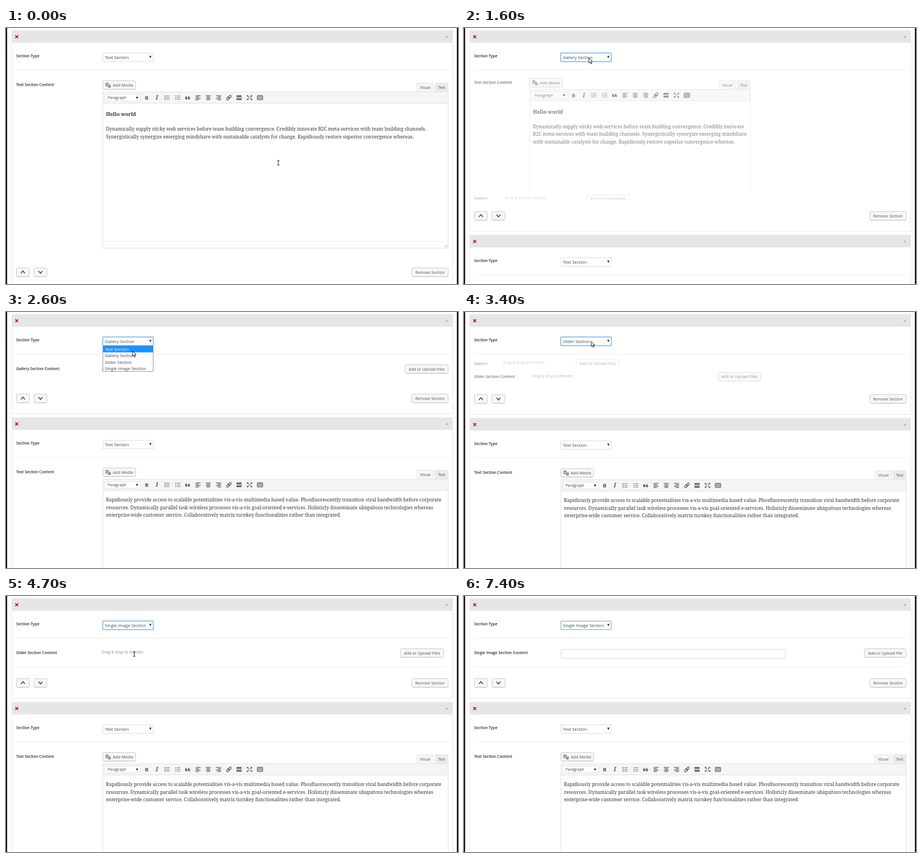
These frames come from a looping animation (800 px wide and 454 px high, 7.5 s). An HTML page with a canvas:

```html
<!DOCTYPE html>
<html lang="en">
<head>
<meta charset="utf-8">
<title>Section type editor</title>
<style>
  html, body { margin: 0; width: 100%; height: 100%; overflow: hidden; background: #fff; }
  canvas { display: block; }
</style>
</head>
<body>
<canvas id="stage" width="800" height="454"></canvas>
<script>
const ctx = document.getElementById('stage').getContext('2d');
const LOOP = 7500;
const SANS = '"Open Sans", "Noto Sans", sans-serif';
const SERIF = '"Noto Serif", serif';
const INK = '#444', LABEL = '#23282d', ICON = '#50555a';

const TYPES = ['Text', 'Gallery', 'Slider', 'Single Image'];
const HEIGHTS = [330, 50, 51, 50.5];

// Each change: list open time, pick time, slide start, and the item x positions while sliding.
const CHANGES = [
  { open: 850, pick: 1350, start: 1438, oldX: [116, 507], newX: [73, 217] },
  { open: 2400, pick: 3150, start: 3175, oldX: [69, 198], newX: [120, 449] },
  { open: 3850, pick: 4600, start: 4700, oldX: [120, 449], newX: [139, 310] }
];
const SLIDE = 400;

const POINTER = [
  [0, 482, 239], [100, 482, 239], [700, 222, 53], [950, 222, 53], [1200, 223, 77],
  [1350, 223, 77], [1550, 221, 53], [2350, 222, 54], [2550, 224, 69], [2700, 224, 69],
  [2950, 225, 90], [3150, 225, 90], [3350, 225, 52], [3850, 225, 53], [4250, 227, 101],
  [4600, 227, 103], [5450, 227, 103], [5850, 221, 91], [7500, 221, 91]
];

const FIRST_WIDE = [
  'Dynamically supply sticky web services before team building convergence. Credibly innovate B2C meta-services with team building channels.',
  'Synergistically synergize emerging mindshare with sustainable catalysts for change. Rapidiously restore superior convergence whereas.'
];
const FIRST_NARROW = [
  'Dynamically supply sticky web services before team building convergence. Credibly innovate',
  'B2C meta-services with team building channels. Synergistically synergize emerging mindshare',
  'with sustainable catalysts for change. Rapidiously restore superior convergence whereas.'
];
const SECOND = [
  'Rapidiously provide access to scalable potentialities vis-a-vis multimedia based value. Phosfluorescently transition viral bandwidth before corporate',
  'resources. Dynamically parallel task wireless processes vis-a-vis goal-oriented e-services. Holisticly disseminate ubiquitous technologies whereas',
  'enterprise-wide customer service. Collaboratively matrix turnkey functionalities rather than integrated.'
];

const swing = p => 0.5 - Math.cos(Math.PI * Math.min(1, Math.max(0, p))) / 2;

// Text is laid out at ten times its size so that glyph advances stay fractional.
function text(str, x, middle, size, { color = INK, weight = 400, style = 'normal', family = SANS, align = 'left' } = {}) {
  ctx.save();
  ctx.translate(x, middle + size * 0.36);
  ctx.scale(0.1, 0.1);
  ctx.font = `${style} ${weight} ${size * 10}px ${family}`;
  ctx.fillStyle = color;
  ctx.textAlign = align;
  ctx.fillText(str, 0, 0);
  ctx.restore();
}

function rect(x, y, w, h, color) {
  ctx.fillStyle = color;
  ctx.fillRect(x, y, w, h);
}

function box(x, y, w, h, fill, stroke, radius = 0) {
  ctx.beginPath();
  ctx.roundRect(x + 0.5, y + 0.5, w - 1, h - 1, radius);
  ctx.fillStyle = fill;
  ctx.fill();
  ctx.lineWidth = 1;
  ctx.strokeStyle = stroke;
  ctx.stroke();
}

function line(points, color = ICON, width = 1) {
  ctx.beginPath();
  points.forEach(([x, y]) => ctx.lineTo(x, y));
  ctx.lineWidth = width;
  ctx.strokeStyle = color;
  ctx.stroke();
}

function shape(points, color) {
  ctx.beginPath();
  points.forEach(([x, y]) => ctx.lineTo(x, y));
  ctx.closePath();
  ctx.fillStyle = color;
  ctx.fill();
}

function dot(x, y, r, color = ICON) {
  ctx.beginPath();
  ctx.arc(x, y, r, 0, 7);
  ctx.fillStyle = color;
  ctx.fill();
}

const downArrow = (x, y) => shape([[x - 2, y - 2], [x + 2, y - 2], [x, y + 2]], '#222');

function button(x, y, w, label) {
  box(x, y, w, 16, '#f7f7f7', '#ccc', 2);
  rect(x + 1, y + 16, w - 2, 1, '#e4e4e4');
  text(label, x + w / 2, y + 8, 7.05, { color: '#555', align: 'center' });
}

function alignIcon(x, y, side) {
  [9, 6, 9, 6].forEach((w, i) =>
    rect(x - 4.5 + (9 - w) * side, y - 4 + i * 2.4, w, 1.2, ICON));
}

function listIcon(x, y, numbered) {
  for (let i = -1; i <= 1; i++) {
    if (numbered) rect(x - 4, y + i * 3 - 1, 0.9, 2, ICON);
    else dot(x - 3.5, y + i * 3, 0.9);
    rect(x - 1.5, y + i * 3 - 0.5, 6, 1, '#777');
  }
}

function quoteIcon(x, y) {
  for (const dx of [-2.4, 2.4]) {
    dot(x + dx, y + 1.3, 1.9);
    ctx.beginPath();
    ctx.arc(x + dx + 1, y + 0.6, 2.6, Math.PI, Math.PI * 1.5);
    ctx.lineWidth = 1.2;
    ctx.strokeStyle = ICON;
    ctx.stroke();
  }
}

function linkIcon(x, y) {
  ctx.save();
  ctx.translate(x, y);
  ctx.rotate(-Math.PI / 4);
  ctx.lineWidth = 1.2;
  ctx.strokeStyle = ICON;
  for (const dx of [-5.2, -0.8]) {
    ctx.beginPath();
    ctx.roundRect(dx, -1.8, 6, 3.6, 1.8);
    ctx.stroke();
  }
  ctx.restore();
}

function moreIcon(x, y) {
  rect(x - 4.5, y - 4, 9, 2.6, ICON);
  for (let i = 0; i < 3; i++) rect(x - 4.5 + i * 3.4, y - 0.5, 2.2, 1, ICON);
  rect(x - 4.5, y + 1.4, 9, 2.6, ICON);
}

function expandIcon(x, y) {
  for (const sx of [-1, 1]) for (const sy of [-1, 1]) {
    line([[x + sx, y + sy], [x + 4 * sx, y + 3.5 * sy]], ICON, 1.2);
    shape([[x + 4.7 * sx, y + 4.2 * sy], [x + 1.8 * sx, y + 4.2 * sy], [x + 4.7 * sx, y + 1.4 * sy]], ICON);
  }
}

function keyboardIcon(x, y) {
  box(x - 5, y - 4.5, 11, 9, '#97999c', '#777b7f', 1);
  for (let i = 0; i < 8; i++) rect(x - 3.4 + (i % 4) * 2.1, y - 2.3 + (i >> 2) * 2, 1, 1, '#ddd');
  rect(x - 2, y + 1.8, 5, 0.9, '#ddd');
}

function mediaIcon(x, y) {
  const color = '#72777c';
  ctx.lineWidth = 1.2;
  ctx.strokeStyle = color;
  ctx.strokeRect(x - 4, y - 3, 4.6, 4.2);
  rect(x - 3, y - 4.4, 2.6, 1.4, color);
  dot(x - 1.7, y - 0.9, 0.9, color);
  line([[x + 2.2, y + 3], [x + 2.2, y - 0.6], [x + 4.4, y - 0.6], [x + 4.4, y + 2.8]], color);
  dot(x + 1.5, y + 3.2, 1.2, color);
  dot(x + 3.7, y + 3, 1.2, color);
}

function toolbar(left, right, y) {
  box(left, y, right - left, 21, '#f5f5f5', '#e3e3e3');
  const mid = y + 10.5;
  const x = offset => left + offset;
  box(x(4), y + 4, 64, 13, '#fff', '#e4e4e4');
  text('Paragraph', x(9), mid, 6.8);
  downArrow(x(61), mid + 0.5);
  text('B', x(78), mid, 9.5, { weight: 700, color: ICON, align: 'center' });
  text('I', x(96), mid, 10, { weight: 700, style: 'italic', family: SERIF, color: ICON, align: 'center' });
  listIcon(x(114), mid, false);
  listIcon(x(133), mid, true);
  quoteIcon(x(150.5), mid);
  [0, 0.5, 1].forEach((side, i) => alignIcon(x(169 + i * 18), mid, side));
  linkIcon(x(223.5), mid);
  moreIcon(x(241.5), mid);
  expandIcon(x(260), mid);
  keyboardIcon(x(278), mid);
}

function tab(x, y, w, label, fill) {
  box(x, y, w, 17, fill, '#e5e5e5');
  text(label, x + w / 2, y + 8.5, 6.8, { color: '#555', align: 'center' });
}

const rowLabel = (str, y) => text(str, 18, y, 6.75, { weight: 600, color: LABEL });

function textRow(y, left, right, heading, lines) {
  rowLabel('Text Section Content', y + 27);
  button(left, y + 19, 59, '');
  mediaIcon(left + 9.5, y + 27.5);
  text('Add Media', left + 18, y + 27.5, 7.2, { color: '#555' });
  tab(right - 56, y + 23, 30, 'Visual', '#f5f5f5');
  tab(right - 24, y + 23, 24, 'Text', '#ebebeb');
  box(left, y + 39, right - left, 278, '#fff', '#e3e3e3');
  toolbar(left, right, y + 39);
  rect(left + 1, y + 304, right - left - 2, 1, '#eee');
  for (let i = 0; i < 3; i++)
    line([[right - 7 + i * 2, y + 315], [right - 2, y + 310 + i * 2]], '#aaa', 0.8);
  if (heading) text(heading, left + 6, y + 79, 8.9, { weight: 700, family: SERIF, color: '#333' });
  lines.forEach((str, i) =>
    text(str, left + 6, y + (heading ? 105 : 76) + i * 13.7, 8.4, { family: SERIF, color: '#333' }));
}

function contentRow(type, y, slideX) {
  if (type === 0) {
    const [left, right] = slideX || [171, 783];
    textRow(y, left, right, 'Hello world', slideX ? FIRST_NARROW : FIRST_WIDE);
  } else if (type === 3) {
    const [inputX, buttonX] = slideX || [171, 708];
    rowLabel('Single Image Section Content', y + 27);
    box(inputX, y + 20, slideX ? 162 : 398, 17, '#fff', '#ddd');
    button(buttonX, y + 19, 75, 'Add or Upload File');
  } else {
    const [hintX, buttonX] = slideX || [169.5, type === 1 ? 706 : 698];
    rowLabel(slideX && type === 1 ? 'Gallery' : TYPES[type] + ' Section Content', y + 27);
    text('Drag & Drop to Reorder', hintX, y + 25.5, 7.1, { style: 'italic', color: '#8c8c8c' });
    button(buttonX, y + 19, 77, 'Add or Upload Files');
  }
}

function slidingRow(type, y, shown, slideX) {
  const lift = (type === 0 ? 12 : 16) * (1 - shown);
  ctx.save();
  ctx.beginPath();
  ctx.rect(11, y, 779, HEIGHTS[type] * shown);
  ctx.clip();
  ctx.globalAlpha = shown;
  contentRow(type, y - lift, slideX);
  ctx.restore();
}

function selectBox(y, type, focus) {
  if (focus === 'full') box(170, y - 1, 92, 18, '#fff', '#cfe4f5', 1);
  box(171, y, 90, 16, '#fff', focus ? '#6ba8de' : '#ddd');
  text(TYPES[type] + ' Section', 175, y + 8.3, 7.6);
  downArrow(255.5, y + 7.5);
}

function sectionHead(top, bottom, type, focus) {
  rect(10, top, 781, bottom - top, '#e8e8e8');
  rect(11, top + 22, 779, bottom - top - 23, '#fff');
  rect(10, top, 781, 22, '#e6e6e6');
  const y = top + 11.5;
  line([[16.5, y - 2.5], [21.5, y + 2.5]], '#a00', 1.5);
  line([[21.5, y - 2.5], [16.5, y + 2.5]], '#a00', 1.5);
  shape([[778.5, y + 1.5], [782.5, y + 1.5], [780.5, y - 2]], '#aaa');
  rowLabel('Section Type', top + 46);
  selectBox(top + 40, type, focus);
  rect(18, top + 70, 766, 1, '#eee');
}

function sectionFoot(y) {
  [18, 49].forEach((x, i) => {
    button(x, y - 8, 24, '');
    const tip = i ? 2 : -2;
    line([[x + 8.5, y - tip], [x + 12, y + tip], [x + 15.5, y - tip]], '#444', 1.5);
  });
  button(718, y - 8, 65, 'Remove Section');
}

function dropdown(type, pointerY) {
  const hover = pointerY < 60 ? type : Math.min(3, Math.floor((pointerY - 60) / 11.4));
  box(171, 59, 90, 47, '#fff', '#7b9fc6');
  TYPES.forEach((name, i) => {
    if (i === hover) rect(172, 60 + i * 11.4, 88, 11.6, '#1e90ff');
    text(name + ' Section', 175, 66.2 + i * 11.4, 7.6, { color: i === hover ? '#fff' : INK });
  });
}

function pointerAt(t) {
  const i = POINTER.findIndex(key => key[0] > t);
  const [t0, x0, y0] = POINTER[i - 1], [t1, x1, y1] = POINTER[i];
  const p = swing((t - t0) / (t1 - t0));
  return [x0 + (x1 - x0) * p, y0 + (y1 - y0) * p];
}

function drawPointer(x, y, beam) {
  if (beam) {
    line([[x, y - 4], [x, y + 4]], '#222');
    for (const end of [y - 4, y + 4]) line([[x - 2, end], [x + 2, end]], '#222');
    return;
  }
  const arrow = [[0, 0], [0, 9], [2, 7.2], [3.6, 10.6], [5.1, 10], [3.6, 6.7], [6.4, 6.4], [0, 0]]
    .map(([dx, dy]) => [x + dx, y + dy]);
  shape(arrow, '#fff');
  line(arrow, '#111', 0.9);
}

function draw(t) {
  const picked = CHANGES.filter(c => t >= c.pick).length;
  const started = CHANGES.filter(c => t >= c.start).length;
  const change = CHANGES[started - 1];
  const p = change ? swing((t - change.start) / SLIDE) : 1;
  const sliding = change && p < 1;
  const height = sliding
    ? HEIGHTS[started - 1] * (1 - p) + HEIGHTS[started] * p
    : HEIGHTS[started];
  const open = CHANGES.some(c => t >= c.open && t < c.pick);
  const focus = t < 800 ? '' : t < 7300 ? 'full' : 'thin';
  const rowTop = 74;
  const end = Math.round(rowTop + height);

  rect(0, 0, 800, 454, '#fdfdfd');
  sectionHead(4, end + 57, picked, focus);
  // The outgoing row keeps its table layout for the first instant of the slide.
  if (sliding) {
    const split = rowTop + HEIGHTS[started - 1] * (1 - p);
    slidingRow(started - 1, rowTop, 1 - p, p > 0.01 && change.oldX);
    slidingRow(started, split, p, change.newX);
  } else {
    contentRow(started, rowTop);
  }
  if (started > 1 && (!sliding || p < 0.01)) rect(18, end, 758, 1, '#eee');
  sectionFoot(end + 29);

  const next = end + 63;
  if (next < 454) {
    sectionHead(next, next + 460, 0, '');
    textRow(next + 70, 171, 783, '', SECOND);
  }

  const [x, y] = pointerAt(t);
  if (open) dropdown(picked, y);
  const beam = !open && (t < 1000 ? y > 134 : t > 4500 && y > 93);
  if (t < 7300) drawPointer(x, y, beam);

  rect(0, 0, 2, 454, '#111');
  rect(798, 0, 2, 454, '#111');
}

function tick(now) {
  draw(now % LOOP);
  requestAnimationFrame(tick);
}
draw(0);
requestAnimationFrame(tick);
</script>
</body>
</html>
```
